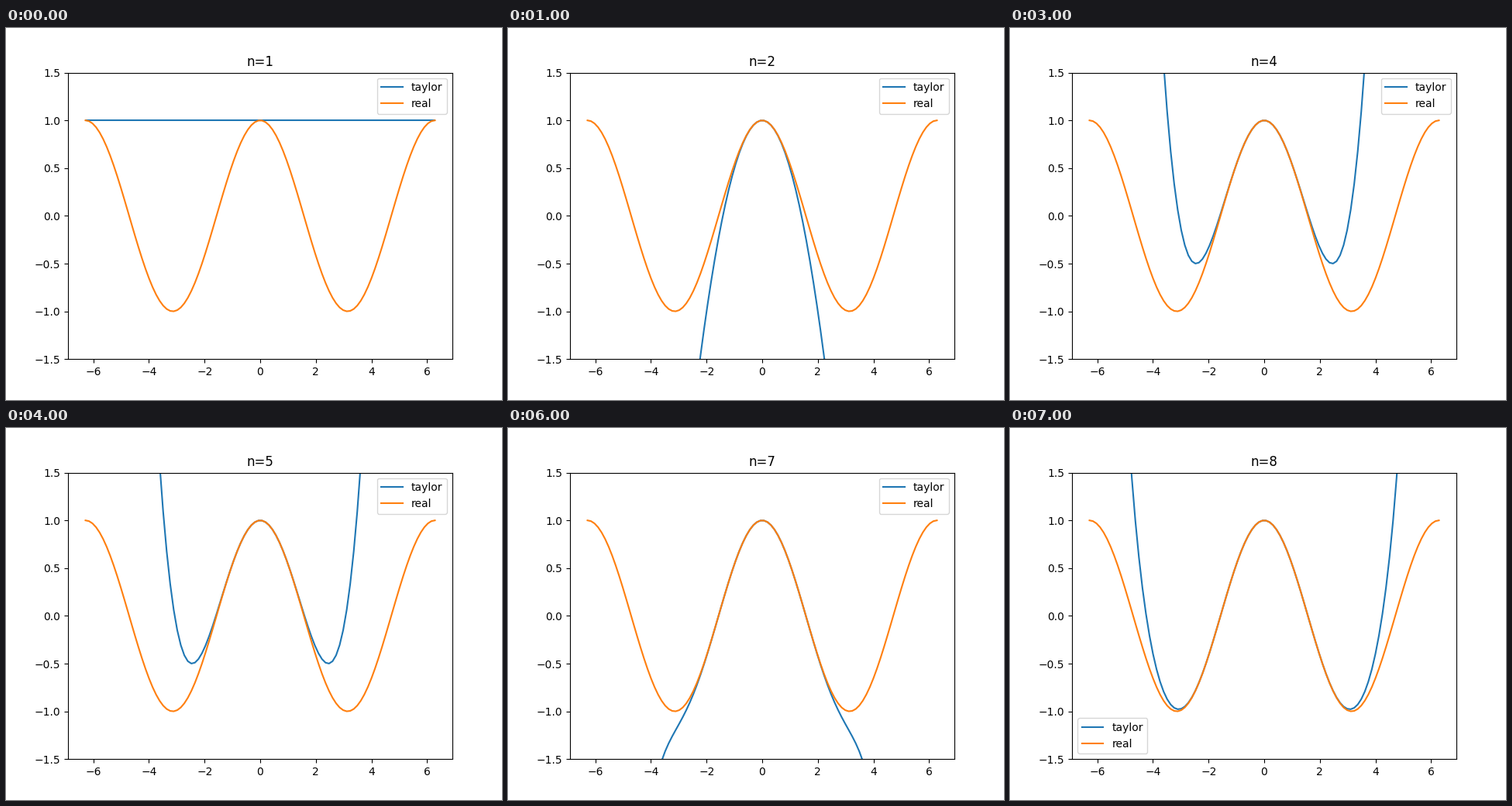
Animation, 640 px wide and 480 px high, one loop 8 s. Source, as a matplotlib script:

```python
import math

import matplotlib.pyplot as plt
import numpy as np
from matplotlib.animation import FuncAnimation

STEPS = 8
X = np.linspace(-2 * np.pi, 2 * np.pi, 100)

fig, ax = plt.subplots(figsize=(6.4, 4.8), dpi=100)
taylor, = ax.plot(X, np.ones_like(X), label="taylor")
ax.plot(X, np.cos(X), label="real")
ax.set_ylim(-1.5, 1.5)
title = ax.set_title("n=1")


def cos_series(x, degree):
    """Maclaurin polynomial of cos up to the given degree."""
    return sum((-1) ** k * x ** (2 * k) / math.factorial(2 * k)
               for k in range(degree // 2 + 1))


def update(i):
    n = i + 1
    taylor.set_ydata(cos_series(X, n))
    title.set_text(f"n={n}")
    # The last curve runs through the upper corners.
    ax.legend(loc="lower left" if n == STEPS else "upper right")
    return taylor, title


anim = FuncAnimation(fig, update, frames=STEPS, init_func=lambda: update(0),
                     interval=1000, repeat=True, repeat_delay=0, blit=False)
plt.show()
```
